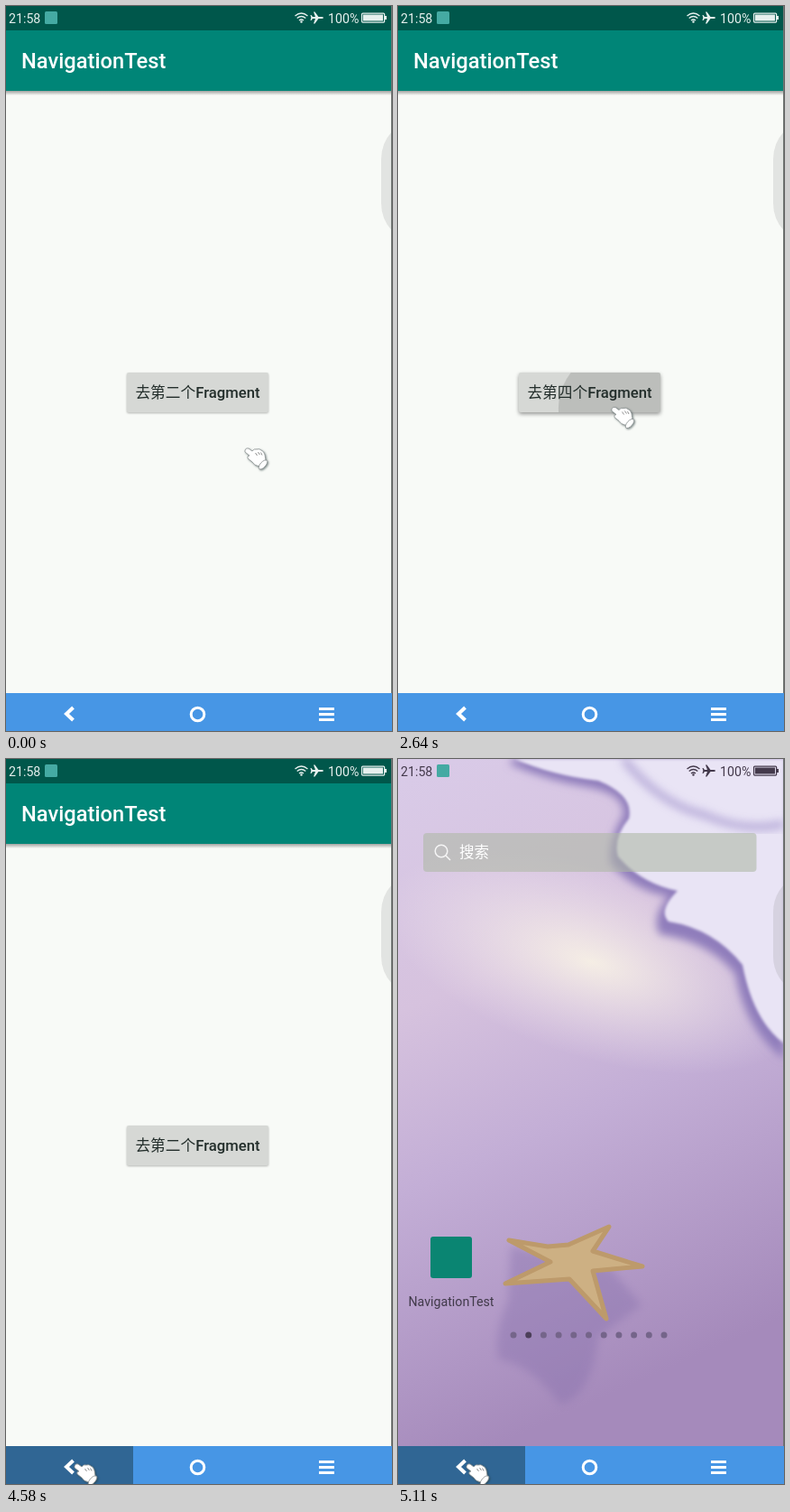
An HTML page that plays this animation: 428 px wide and 803 px high, repeating every 5420 ms.

```html
<!DOCTYPE html>
<html lang="zh">
<head>
<meta charset="utf-8">
<title>NavigationTest</title>
<style>
  html, body { margin: 0; width: 100%; height: 100%; overflow: hidden; }
  svg { display: block; width: 100%; height: 100%; font-family: Roboto, "Noto Sans CJK SC", "Noto Sans CJK", sans-serif; }
  #hand { filter: drop-shadow(1px 1.5px 1px rgba(40, 60, 60, .6)); }
</style>
</head>
<body>
<svg viewBox="0 0 428 803">
  <defs>
    <linearGradient id="sand" x2=".25" y2="1">
      <stop offset="0" stop-color="#d9cbe8"/>
      <stop offset=".35" stop-color="#d6c2de"/>
      <stop offset=".6" stop-color="#c3aed6"/>
      <stop offset="1" stop-color="#a58abb"/>
    </linearGradient>
    <radialGradient id="glow">
      <stop offset="0" stop-color="#fbf6e6" stop-opacity=".85"/>
      <stop offset="1" stop-color="#f3e9ee" stop-opacity="0"/>
    </radialGradient>
    <linearGradient id="drop" x2="0" y2="1">
      <stop offset="0" stop-opacity=".35"/>
      <stop offset="1" stop-opacity="0"/>
    </linearGradient>
    <filter id="soft"><feGaussianBlur stdDeviation="5"/></filter>
    <filter id="soft2"><feGaussianBlur stdDeviation="1.5"/></filter>
    <clipPath id="btnClip"><rect id="clipBox" y="406" height="44" rx="2"/></clipPath>
  </defs>

  <g id="home">
    <rect width="428" height="761" fill="url(#sand)"/>
    <ellipse cx="215" cy="225" rx="240" ry="105" transform="rotate(18 215 225)" fill="url(#glow)"/>
    <path d="M125 6Q165 24 215 32Q252 40 250 62Q232 92 236 116Q262 146 300 152Q280 176 290 194Q345 202 374 238Q385 300 428 332V0H125Z" fill="#8f7dbb" filter="url(#soft)"/>
    <path d="M130 0Q170 18 222 24Q262 40 256 66Q238 88 244 108Q270 138 310 146Q288 168 300 180Q350 188 382 228Q394 290 428 315V0Z" fill="#e9e4f5" filter="url(#soft2)"/>
    <path d="M250 0Q290 50 340 62Q385 82 428 72" fill="none" stroke="#a99bd0" stroke-width="9" opacity=".7" filter="url(#soft)"/>
    <path d="M122 600Q105 640 112 665Q150 672 180 715Q215 705 222 640L270 605L232 560L125 540Z" fill="#8670ac" opacity=".4" filter="url(#soft)"/>
    <path d="M123 533L166 540L189 538L234 518L216 545L271 562L216 567L231 620L190 576L119 581L169 557Z" fill="#cdb083" stroke="#bd9a6b" stroke-width="5" stroke-linejoin="round"/>
    <rect x="28" y="82" width="369.500" height="43" rx="4" fill="#aeb8a6" opacity=".58"/>
    <g fill="none" stroke="#fff" stroke-width="1.500" opacity=".85"><circle cx="48" cy="102" r="6.800"/><path d="M53 107l5 5"/></g>
    <text x="68" y="109" font-size="16.500" fill="#fff">搜索</text>
    <rect x="36" y="529" width="46" height="46" rx="3" fill="#0a8572"/>
    <text x="59" y="605.500" font-size="14.200" text-anchor="middle" fill="#413a4a">NavigationTest</text>
    <g id="dots" fill="#75658a"></g>
  </g>

  <g id="app">
    <rect width="428" height="761" fill="#f8faf7"/>
    <rect y="94" width="428" height="5" fill="url(#drop)"/>
    <rect y="27" width="428" height="67" fill="#008577"/>
    <rect width="428" height="27" fill="#00574b"/>
    <text x="17" y="69" font-size="23.700" font-weight="500" fill="#fff">NavigationTest</text>
    <rect id="btn" y="406" height="44" rx="2" fill="#d6d8d5"/>
    <g clip-path="url(#btnClip)"><circle id="ripple" cx="243" cy="446"/></g>
    <text x="212.500" y="433.500" font-size="16.700" text-anchor="middle" fill="#222d2a"><tspan id="label"></tspan><tspan font-weight="500">Fragment</tspan></text>
  </g>

  <g id="status" fill="currentColor" stroke="none" font-size="14.200">
    <text x="3" y="18.500">21:58</text>
    <rect x="43" y="6" width="14" height="14" rx="1.500" fill="#45aaa3"/>
    <g fill="none" stroke="currentColor" stroke-width="1.300">
      <path d="M320.500 11Q327.500 5 334.500 11M322.700 13.500Q327.500 9.500 332.300 13.500M325 16Q327.500 14 330 16"/>
      <rect x="394.600" y="8.100" width="25" height="10" rx="1"/>
    </g>
    <circle cx="327.500" cy="17.500" r="1.200"/>
    <path d="M352 13Q352 12 350 12H346.500L342.500 6.500H341L343 12H340L338.500 10H337.500L338.300 13L337.500 16H338.500L340 14H343L341 19.500H342.500L346.500 14H350Q352 14 352 13Z"/>
    <text x="357" y="18.500">100%</text>
    <path d="M396 9.500h22v7h-22zM420 11h2v4h-2z"/>
  </g>

  <path d="M428 139Q416 152 416 170V218Q416 236 428 249Z" fill="#777" opacity=".17"/>
  <path d="M427.500 0V761" stroke="#6f7673"/>

  <rect y="761" width="428" height="42" fill="#4796e5"/>
  <rect id="backPress" y="761" width="141" height="42" fill="#306694"/>
  <g fill="none" stroke="#fff">
    <path d="M74.500 777l-7.500 7 7.500 7" stroke-width="4"/>
    <circle cx="212.500" cy="784.500" r="7.300" stroke-width="3"/>
    <path d="M347 778.500h17M347 784.500h17M347 790.500h17" stroke-width="3"/>
  </g>

  <g id="hand" fill="#fff" stroke="#8b9191" stroke-width=".8">
    <path d="M1 3Q2 0 5 1L9 4Q11 1 14 2Q17 1 19 3Q22 4 23 8L24 14L17 21Q11 20 9 16L4 12Q3 9 6 9L1 5Z"/>
    <path d="M12.500 6l2 3M15.500 5l2 3M18.500 5.500l1.500 3" fill="none" stroke="#777"/>
    <ellipse cx="21" cy="19" rx="6.300" ry="3" transform="rotate(-48 21 19)"/>
  </g>
</svg>
<script>
const $ = id => document.getElementById(id);
const set = (id, attrs) => { for (const k in attrs) $(id).setAttribute(k, attrs[k]); };
const part = (t, a, b) => Math.min(1, Math.max(0, (t - a) / (b - a)));
const ease = p => p * p * (3 - 2 * p);
const mix = (a, b, p) => a + (b - a) * p;

const LOOP = 5420;
// Press start, page change, label of the new page
const pages = [
  [830, 980, '去第三个'],
  [1630, 1750, '去第四个'],
  [2520, 2700, '返回第一个'],
  [3530, 3750, '去第二个']
];

$('dots').innerHTML = Array.from({ length: 11 }, (_, i) =>
  `<circle cx="${128 + 16.7 * i}" cy="638" r="3.500"${i == 1 ? ' fill="#4c3f59"' : ''}/>`).join('');

function drawButton(t) {
  let label = '去第二个', press = 0, spread = 0;
  for (const [start, change, next] of pages) {
    if (t >= change) label = next;
    else if (t >= start) {
      press = part(t, start - 40, start + 40);
      spread = part(t, start + 20, change + 60);
    }
  }
  const width = label.length > 4 ? 174 : 157;
  const box = { x: 212.5 - width / 2, width };
  set('btn', box);
  set('clipBox', box);
  $('btn').style.filter = `drop-shadow(0 ${1 + press}px ${1 + press}px rgba(0,0,0,${.28 + .12 * press}))`;
  set('ripple', { r: mix(10, 130, spread), opacity: spread ? .12 : 0 });
  if ($('label').textContent != label) $('label').textContent = label;
}

function drawHand(t) {
  const up = ease(part(t, 320, 670)), down = ease(part(t, 3920, 4410));
  const x = mix(mix(264, 236, up), 75, down);
  const y = mix(mix(489, 443.5, up), 780, down);
  set('hand', { transform: `translate(${x} ${y})` });
  set('backPress', { opacity: t >= 4450 ? 1 : 0 });
}

function drawExit(t) {
  const p = part(t, 4690, 5020), s = 1 - .23 * p;
  set('app', {
    transform: `translate(${208 * (1 - s)} ${370 * (1 - s)}) scale(${s})`,
    opacity: 1 - p ** 1.5
  });
  set('status', { color: t < 5040 ? '#e6f0ee' : '#443a4c' });
}

function frame() {
  const t = performance.now() % LOOP;
  drawButton(t);
  drawHand(t);
  drawExit(t);
  requestAnimationFrame(frame);
}
frame();
</script>
</body>
</html>
```
